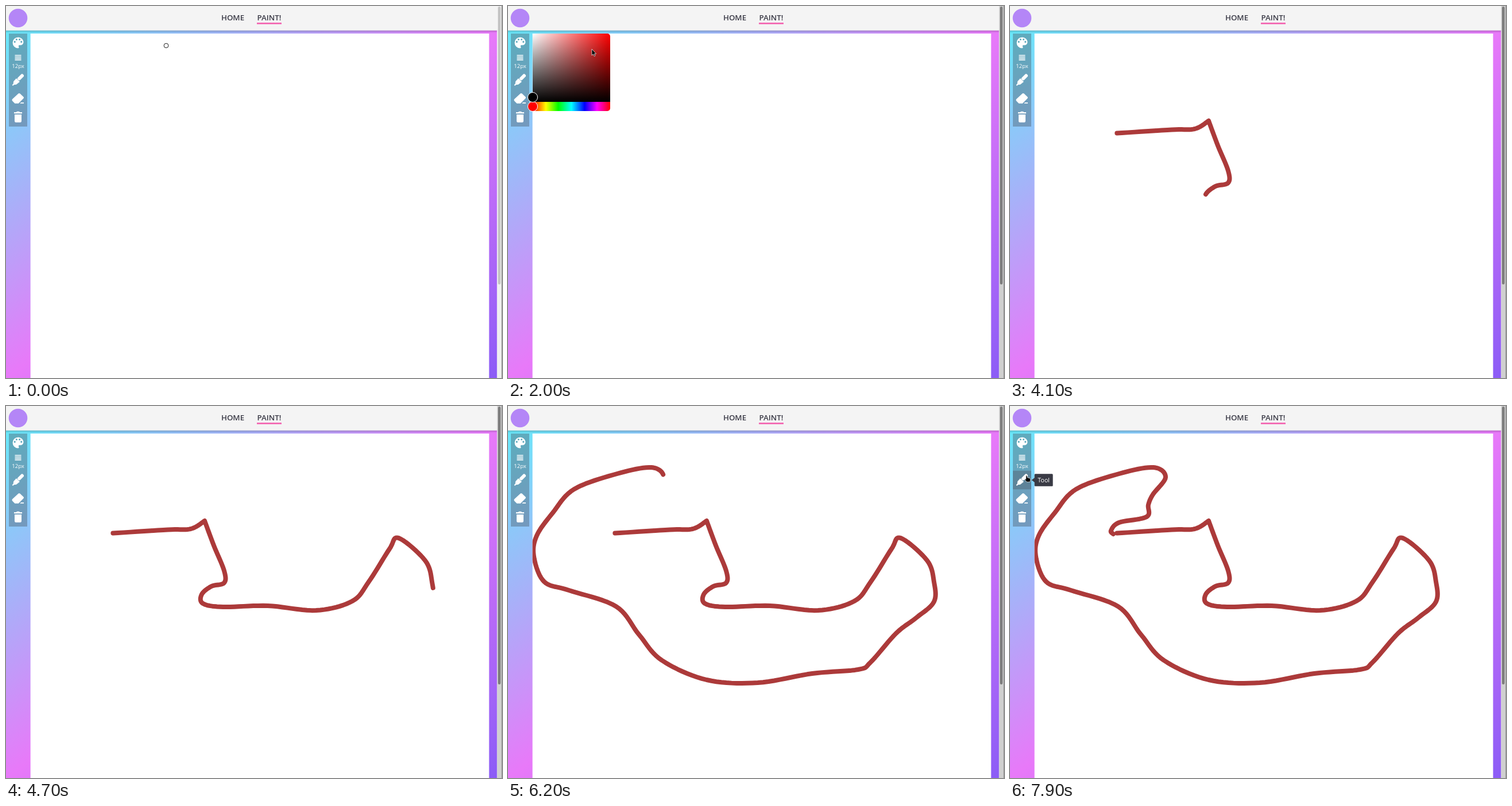
These frames come from a looping animation (864x648 px, 8000 ms). An HTML page:

```html
<!DOCTYPE html>
<html lang="en">
<head>
<meta charset="utf-8">
<title>Paint</title>
<style>
html, body { margin: 0; width: 864px; height: 648px; overflow: hidden; background: #fff; }
body { position: relative; font-family: "Open Sans", "Noto Sans", sans-serif; }
svg, .picker { position: absolute; left: 0; top: 0; }
.picker {
  left: 42.67px; top: 48px; width: 135px; height: 135px; border-radius: 0 5px 5px 0;
  background:
    linear-gradient(90deg, red, #ff0 17%, #0f0 33%, #0ff 50%, #00f 67%, #f0f 83%, red) 0 119px / 100% 16px no-repeat,
    linear-gradient(transparent, #000) 0 0 / 100% 119px no-repeat,
    linear-gradient(90deg, #fff, red);
}
.picker i {
  position: absolute; left: 0; top: 127px; box-sizing: border-box; width: 18px; height: 18px; margin: -9px;
  border: 1.5px solid #fff; border-radius: 50%; background: red;
}
#shadeThumb { top: 110.5px; background: #000; }
#shadeThumb.picked { left: 89px; top: 39px; background: #ac3a3a; }
</style>
</head>
<body>
<svg width="864" height="648">
  <defs>
    <linearGradient id="sky" x2="1" y2="1">
      <stop stop-color="#67e8f9"/><stop offset=".5" stop-color="#e879f9"/><stop offset="1" stop-color="#8b5cf6"/>
    </linearGradient>
    <linearGradient id="shade" x2="0" y2="1">
      <stop stop-opacity=".22"/><stop offset="1" stop-opacity="0"/>
    </linearGradient>
    <clipPath id="sheet"><path d="M42.67 48H841.5V648H42.67z"/></clipPath>
  </defs>
  <rect y="42" width="855.5" height="606" fill="url(#sky)"/>
  <rect y="42" width="855.5" height="5" fill="url(#shade)"/>
  <rect width="855.5" height="42.67" fill="#f4f4f4"/>
  <circle cx="21" cy="21" r="16.3" fill="#b486f7"/>
  <g font-size="13.33" font-weight="600" fill="#3b3b47" text-anchor="middle">
    <text x="395" y="25">HOME</text><text x="458.5" y="25">PAINT!</text>
  </g>
  <rect x="437" y="29" width="43" height="2.67" fill="#f364b1"/>
  <g clip-path="url(#sheet)">
    <rect width="864" height="648" fill="#fff"/>
    <polyline id="stroke" fill="none" stroke="#ac3a3a" stroke-width="8" stroke-linecap="round" stroke-linejoin="round"/>
  </g>
  <g fill="#4b5563" fill-opacity=".4">
    <rect x="5" y="48" width="32" height="162"/>
    <rect id="hover" x="5" width="32" height="32.4"/>
  </g>
  <g fill="#fff">
    <path transform="translate(8.4 51.4) scale(1.05)" fill-rule="evenodd" d="M12 3a9 9 0 0 0 0 18 1.5 1.5 0 0 0 1.1-2.5 1.5 1.5 0 0 1 1.1-2.5H16a5 5 0 0 0 5-5c0-4.4-4-8-9-8zM5 10.5a1.5 1.5 0 1 0 3 0 1.5 1.5 0 1 0-3 0zM8 6.5a1.5 1.5 0 1 0 3 0 1.5 1.5 0 1 0-3 0zM13 6.5a1.5 1.5 0 1 0 3 0 1.5 1.5 0 1 0-3 0zM16 10.5a1.5 1.5 0 1 0 3 0 1.5 1.5 0 1 0-3 0z"/>
    <path d="M15.5 86h11m-11 2.7h11m-11 2.7h11m-11 2.7h11" stroke="#fff" stroke-width="1.5"/>
    <text x="21" y="107.5" font-size="9.6" text-anchor="middle">12px</text>
    <path d="M28 121.500L23 126.500" stroke="#fff" stroke-width="6" stroke-linecap="round"/>
    <path d="M18 126L24 132 18 136.800 14 137.200 12 139 10.600 137.600 12.600 135.800 13.200 131.200z"/>
    <path d="M11 162.200L21.600 152.400Q23 151.400 24.400 152.600L30.600 158.400Q31.600 159.800 30.400 161L21.800 169.800H15.400L11 165.200Q9.800 163.600 11 162.200zM26 168h5v1.800h-6.600z"/>
    <path d="M14 185h4l1-1.200h4l1 1.200h4v2.300H14zM15 189h12v11.600q0 2.200-2.200 2.200h-7.600q-2.200 0-2.200-2.200z"/>
  </g>
  <rect id="track" x="855.5" width="8.5" height="648"/>
  <rect id="thumb" x="857" y="1" width="4.6" height="484" rx="2.3"/>
  <path d="M863.5 0V648" stroke="#999"/>
</svg>
<div class="picker" id="picker"><i></i><i id="shadeThumb"></i></div>
<svg width="864" height="648">
  <g id="tip">
    <path d="M37.500 0L43-4V4z" fill="#3a3b45"/>
    <rect x="42.67" y="-10.67" width="32" height="21.33" rx="1.500" fill="#3a3b45"/>
    <text id="tipText" x="58.7" y="4" font-size="10.67" text-anchor="middle" fill="#fff"></text>
  </g>
  <circle id="ring" r="3.9" fill="none"/>
  <g id="cursor" stroke="#fff" stroke-width=".7">
    <path id="arrow" d="M0 0V11L2.500 8.800 4.200 12.500 6 11.700 4.300 8.200H7.600z"/>
    <path id="hand" d="M-.6 0Q.8-.6 1.400 1L2 3.800 5.400 4.500Q7.400 5 7.200 7L6.400 11.300H.8L-2.600 7.600Q-2.800 6 -.8 6.600z"/>
  </g>
</svg>
<script>
const $ = id => document.getElementById(id);
const set = (id, attrs) => { for (const k in attrs) $(id).setAttribute(k, attrs[k]); };
const show = (id, on) => { $(id).style.display = on ? '' : 'none'; };
const clamp = v => Math.min(1, Math.max(0, v));
const LOOP = 8000, STEP = 100, SMOOTH = 10, ROW = 32.4, TOP = 48;

// Catmull-Rom spline through "x,y" key points
function spline(text) {
  const p = text.split(' ').map(s => s.split(',').map(Number));
  return p.slice(1).flatMap((c, i) => {
    const b = p[i], a = p[i - 1] || b, d = p[i + 2] || c;
    return Array.from({ length: SMOOTH }, (_, j) => {
      const u = (j + 1) / SMOOTH;
      return b.map((v, k) => v + u / 2 * (c[k] - a[k]
        + u * (2 * a[k] - 5 * v + 4 * c[k] - d[k] + u * (3 * v - a[k] - 3 * c[k] + d[k]))));
    });
  });
}

// Two smooth parts that meet in a sharp corner
const outline = [
  ...spline('180,222 282,215.5 322,214 346,200'),
  ...spline('346,200 362,243 380,287 380,308 358,314 341,328 343,344 378,350 456,348 540,356 603,340 '
    + '632,306 668,249 684,230 730,269 742,306 742,341 711,369 676,396 632,446 610,459 530,466 '
    + '435,482 346,477 268,443 228,398 188,349 106,321 63,306 45,262 50,226 78,186 115,145 190,118 '
    + '250,107 271,124 249,154 241,172 238,193 190,203 176,217 180,223')
];

// Linear interpolation between rows of [time, ...values]
function track(rows, t) {
  const i = Math.max(0, rows.findLastIndex(r => r[0] <= t)), a = rows[i], b = rows[i + 1] || a;
  const u = clamp((t - a[0]) / (b[0] - a[0] || 1));
  return a.slice(1).map((v, k) => v + (b[k + 1] - v) * u);
}

// Time and number of key points passed
const drawing = [[3400, 0], [4100, 8], [4300, 12.7], [5400, 28], [6100, 37], [7000, 44]];
const pointer = [
  [200, 279, 69], [500, 27, 62], [1600, 27, 62], [2000, 146, 75], [2300, 132, 87], [2500, 132, 87],
  [3000, 204, 242], [3400, 180, 222], [7000, 180, 222], [7200, 47, 128], [7300, 28, 102], [7800, 28.5, 121]
];
const labels = ['Color', '', 'Tool'];
const rowAt = t => {
  const [x, y] = track(pointer, t);
  return x < 38 ? Math.floor((y - TOP) / ROW) : -1;
};

function render(t) {
  const open = clamp(Math.min(clamp((t - 1200) / 400) ** 1.6, (3000 - t) / 300));
  $('picker').style.opacity = open;
  $('shadeThumb').className = t >= 2400 ? 'picked' : '';

  const kindAt = (x, y) => x < 38 ? 'hand' : x < 43 || (open && x < 178 && y < 183) ? 'arrow' : 'ring';
  const [x, y] = track(pointer, t), kind = kindAt(x, y);
  set('cursor', { transform: `translate(${x} ${y})` });
  show('arrow', kind === 'arrow');
  show('hand', kind === 'hand');

  // The page reacts to the pointer one step late
  const [cx, cy] = track(pointer, t - STEP);
  const busy = t > 3400 && t <= 7000;
  show('ring', !busy && kindAt(cx, cy) === 'ring');
  set('ring', { cx, cy, stroke: t < 2400 ? '#222' : '#c04848' });

  const row = rowAt(t - STEP);
  show('hover', row >= 0);
  set('hover', { y: TOP + row * ROW });
  const label = !open && rowAt(t - 2 * STEP) === row && labels[row];
  show('tip', label);
  set('tip', { transform: `translate(0 ${TOP + (row + .5) * ROW})` });
  $('tipText').textContent = label || '';

  const active = t >= 1300;
  set('track', { fill: active ? '#d0d0d0' : '#f0f0f0' });
  set('thumb', { fill: active ? '#7d7d7d' : '#c4c4c4' });
  set('stroke', { points: outline.slice(0, Math.round(track(drawing, t)[0] * SMOOTH)).join(' ') });
}

function tick() {
  render(Math.floor(performance.now() % LOOP / STEP) * STEP);
  requestAnimationFrame(tick);
}
tick();
</script>
</body>
</html>
```
